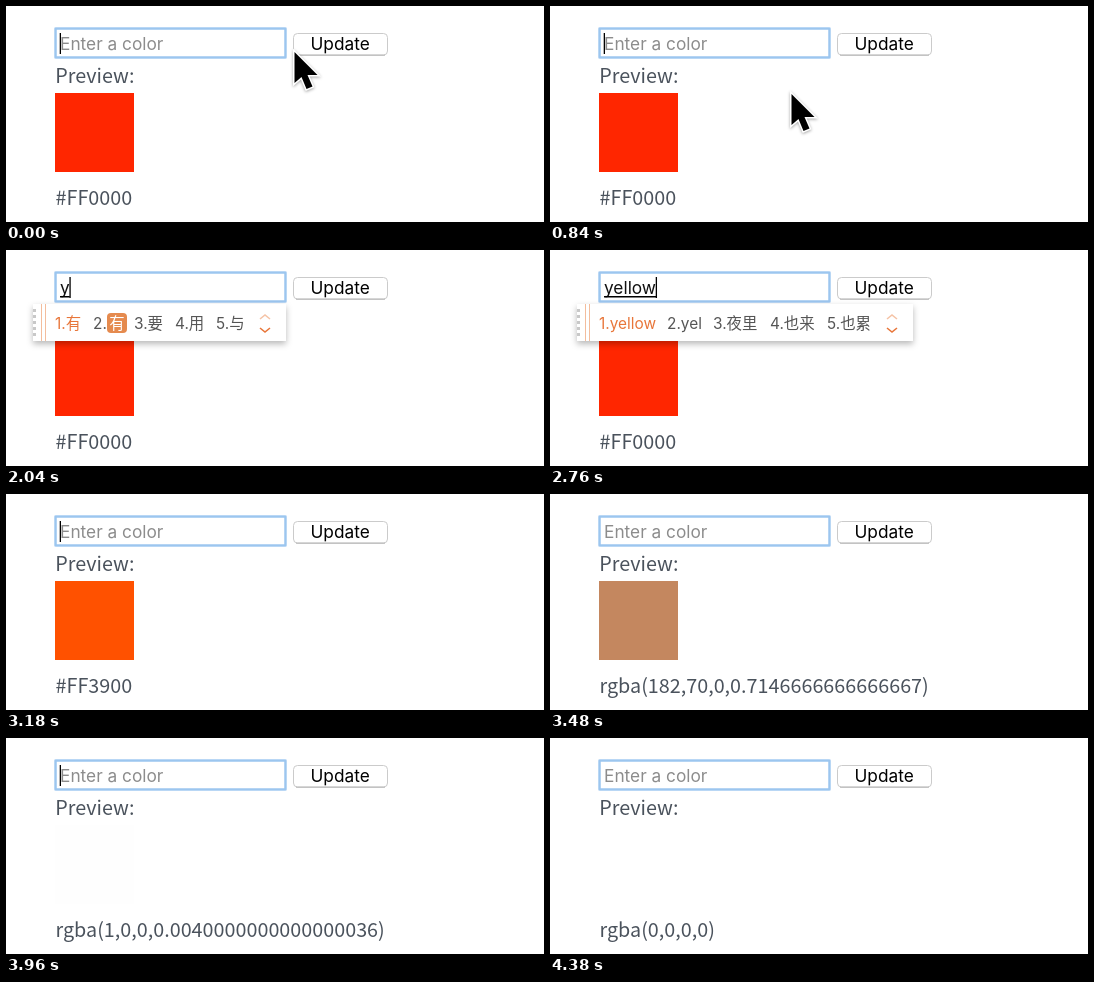
An HTML page for the animation above (4.92 s loop, 538 by 216 pixels).

```html
<!DOCTYPE html>
<html lang="en">
<head>
<meta charset="utf-8">
<title>Color preview</title>
<style>
  html, body { margin: 0; width: 100%; height: 100%; overflow: hidden; background: #fff; }
  svg { display: block; width: 538px; height: 216px; }
  text { white-space: pre; }
  .label { font: 19.77px "Noto Sans CJK SC", "Noto Sans CJK JP", "Noto Sans CJK", "Noto Sans", sans-serif; fill: #4a525c; }
  .field { font: 17.3px Inter, sans-serif; fill: #111; }
  .hint { fill: #8c8c8c; }
  .pick { font: 15.4px Inter, "Noto Sans CJK SC", "Noto Sans CJK", sans-serif; fill: #555; }
  .first { fill: #e8763a; }
  .panel { filter: drop-shadow(0 3px 3px rgba(0, 0, 0, .28)); }
  #pointer { filter: drop-shadow(0 1.5px 1.5px rgba(0, 0, 0, .35)); }
</style>
</head>
<body>
<svg viewBox="0 0 538 216">
  <text class="label" x="49.3" y="77">Preview:</text>
  <rect id="swatch" x="49" y="87" width="79" height="79"/>
  <text id="value" class="label" x="49.5" y="199"></text>

  <rect x="48" y="21" width="233" height="32" rx="2" fill="#c3dcf6"/>
  <rect x="49.75" y="22.75" width="229.5" height="28.5" fill="#fff" stroke="#9cc6ef" stroke-width="2"/>
  <text id="hint" class="field hint" x="54" y="44">Enter a color</text>
  <text id="typed" class="field" x="54" y="44"></text>
  <rect id="line" x="54" y="46" height="1.5"/>
  <rect id="caret" y="27" width="1.3" height="21"/>

  <rect x="287.5" y="27.5" width="94" height="21.5" rx="4" fill="#fff" stroke="#cbcbcb"/>
  <path d="M290 49.2H379" stroke="#b4b4b4"/>
  <text class="field" x="304.5" y="44" style="fill:#000">Update</text>

  <g id="popup">
    <rect id="panel" class="panel" x="27" y="54" height="37" fill="#fff"/>
    <path d="M28.5 59V89" stroke="#c8c8c8" stroke-width="3" stroke-dasharray="3 3"/>
    <path d="M35.5 54V91M39.5 54V91" stroke="#f3bd9d"/>
    <g id="picks"></g>
    <g id="arrows" fill="none" stroke-width="1.6">
      <path d="M-5 69L0 65L5 69" stroke="#f5c3a6"/>
      <path d="M-5 78L0 82L5 78" stroke="#e8763a"/>
    </g>
  </g>
  <path id="pointer" d="M0 0V31L7 25L12 37L18 34.5L13 23H23Z" stroke="#fff" stroke-width="3" paint-order="stroke"/>
</svg>
<script>
const LOOP = 4920, STEP = 60, TWEEN = 750, RATE = 333 / 300;
const YELLOW_AT = 3028, CLEAR_AT = 3287;
const $ = id => document.getElementById(id);

// right edge, candidate positions, candidates
const short = [49, 87, 128, 169, 210];
const lists = {
  r: [280, short, ['人', '日', '让', '入', '如']],
  y: [280, short, ['有', '*', '要', '用', '与']],
  ye: [280, short, ['也', '夜', '业', '叶', '爷']],
  yel: [341, [49, 110, 152, 204, 261], ['也来', 'yel', '夜里', '也累', '也']],
  yell: [363, [49, 121, 163, 220, 277], ['也来了', 'yell', '夜里', '也来', '也累']],
  yello: [418, [49, 117, 187, 257, 327], ['yellow', '也来咯', '夜里咯', '也累咯', '也来']],
  yellow: [363, [49, 117, 163, 220, 277], ['yellow', 'yel', '夜里', '也来', '也累']]
};

// time, text, still composing
const typing = [
  [0, '', 0], [960, 'r', 1], [1680, '', 0], [2040, 'y', 1], [2160, 'ye', 1],
  [2280, 'yel', 1], [2400, 'yell', 1], [2460, 'yello', 1], [2700, 'yellow', 1],
  [2880, 'yellow', 0], [3060, '', 0]
];
const blinks = [[0, 1], [1320, 0], [1680, 1], [3480, 0], [3900, 1], [4380, 0]];
const path = [[0, 288.5, 46], [60, 280, 45], [240, 194, 33], [780, 194, 33], [900, 289, 143]];
const fade = [[0, 255, 112, 0], [214, 196, 135, 95], [547, 211, 200, 196], [TWEEN, 255, 255, 255]];

const last = (rows, t) => rows.filter(r => r[0] <= t).pop();

function mix(rows, t) {
  const i = rows.findIndex(r => r[0] > t);
  if (i < 0) return rows[rows.length - 1].slice(1);
  const a = rows[i - 1], b = rows[i], k = (t - a[0]) / (b[0] - a[0]);
  return a.slice(1).map((v, j) => v + (b[j + 1] - v) * k);
}

function showColor(t) {
  let fill = [255, 38, 0], label = '#FF0000';
  if (t >= CLEAR_AT) {
    const ms = Math.min(TWEEN, Math.round(214 + (t - 3480) * RATE));
    const a = 1 - ms / TWEEN;
    fill = mix(fade, ms);
    label = `rgba(${Math.round(255 * a)},${Math.round(98 * a)},0,${a})`;
  } else if (t >= YELLOW_AT) {
    const g = Math.round(255 * (t - YELLOW_AT) * RATE / TWEEN);
    fill = [255, 38 + g * .75, 0];
    label = '#FF' + g.toString(16).toUpperCase().padStart(2, '0') + '00';
  }
  $('swatch').setAttribute('fill', `rgb(${fill.map(Math.round)})`);
  $('value').textContent = label;
}

function pick(word, i, x) {
  const cls = i ? 'pick' : 'pick first';
  if (word !== '*') return `<text class="${cls}" x="${x}" y="79">${i + 1}.${word}</text>`;
  return `<text class="${cls}" x="${x}" y="79">${i + 1}.</text>
    <rect x="101" y="63" width="20" height="20" rx="4" fill="#e58a4e"/>
    <text class="pick" x="103.3" y="78.5" style="fill:#fff">有</text>`;
}

let shown = '';
function showPopup(key) {
  $('popup').style.display = key ? '' : 'none';
  if (!key || key === shown) return;
  const [right, xs, words] = lists[key];
  $('panel').setAttribute('width', right - 27);
  $('arrows').setAttribute('transform', `translate(${right - 21} 0)`);
  $('picks').innerHTML = words.map((w, i) => pick(w, i, xs[i])).join('');
  shown = key;
}

function showField(t) {
  const [, text, composing] = last(typing, t);
  $('hint').style.display = text ? 'none' : '';
  $('typed').textContent = text;
  const w = text ? $('typed').getComputedTextLength() : 0;
  $('line').setAttribute('width', composing ? w : 0);
  $('caret').setAttribute('x', 53.7 + w);
  $('caret').style.display = last(blinks, t)[1] ? '' : 'none';
  showPopup(composing ? text : '');
}

function showPointer(t) {
  $('pointer').style.display = t < 960 ? '' : 'none';
  $('pointer').setAttribute('transform', `translate(${mix(path, t)})`);
}

function draw(now) {
  const t = Math.floor((now % LOOP) / STEP) * STEP;
  showField(t);
  showColor(t);
  showPointer(t);
}

let start;
function tick(now) {
  start ??= now;
  draw(now - start);
  requestAnimationFrame(tick);
}
draw(0);
requestAnimationFrame(tick);
</script>
</body>
</html>
```
